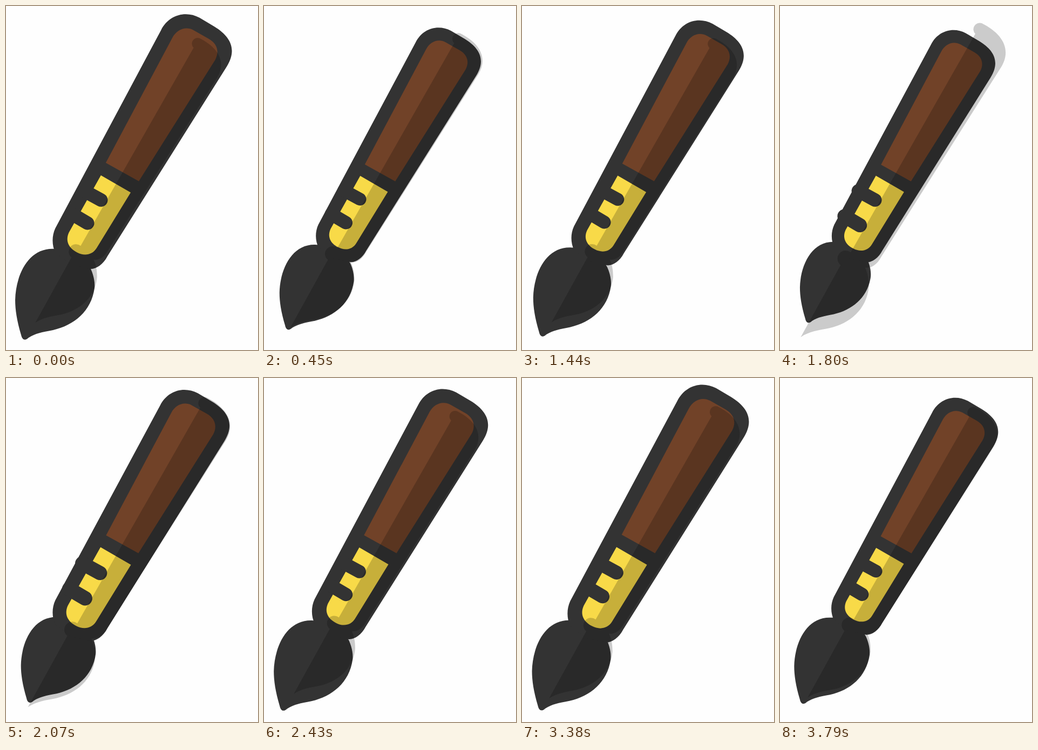
Recreate the animation shown at these times as an HTML page. Size 467x640 px, loop 3.9 s.

```html
<!DOCTYPE html>
<html lang="en">
<head>
<meta charset="utf-8">
<title>Paintbrush</title>
<style>
  html, body { margin: 0; width: 100%; height: 100%; overflow: hidden; background: #fefefe; }
  svg { display: block; width: 100vw; height: 100vh; }
</style>
</head>
<body>
<svg viewBox="0 0 467 640" fill="#333">
  <path id="bristles" d="M28 612C20 585 17 565 17 547C18 500 42 449 90 452L135 452L157 489C163 502 165 515 164 525C158 568 126 594 87 603C66 607 55 609 42 617C36 623 30 622 28 612Z"/>
  <path id="body"/>
  <path id="handle" fill="#714228" d="M185 292L308 60C316 45 332 38 347 46L375 62C391 71 395 86 387 101L246 326Z"/>
  <path id="ferrule" fill="#f8da48" d="M176 315L231 347L168 450C160 463 145 465 132 458C116 450 110 436 117 421Z"/>
  <g fill="none" stroke="#333" stroke-width="25" stroke-linecap="round">
    <path id="upperNotch" d="M145 344L176 361"/>
    <path id="lowerNotch" d="M124 388L151 404"/>
  </g>
  <path id="shade" fill="#000" fill-opacity=".2" d="M36 620L111 484A12 12 0 0 1 130 460L364 48A12 12 0 0 1 376 28C416 48 432 78 413 110L187 469C179 484 168 490 157 489C162 500 164 510 164 525C160 568 128 594 90 603C70 607 52 609 36 620Z"/>
</svg>
<script>
const CX = 209, CY = 329, LOOP = 3900, AMP = .054;

// Every part pulses alike; the lead (degrees) grows from part to part.
const parts = {
  bristles: { lead: 0, mean: .946, x: 202 },
  handle: { lead: 30, mean: .959 },
  ferrule: { lead: 60, mean: .98 },
  upperNotch: { lead: 90, mean: 1.004 },
  lowerNotch: { lead: 120, mean: 1.03 },
  shade: { lead: 150, mean: .943 }
};
const base = { lead: 45, mean: .97 };

const byId = id => document.getElementById(id);

// Held steps: 90 ms each at first, then 100 ms, with a longer last pair.
function stepAt(t) {
  if (t >= 3790) return 41;
  return t < 2880 ? Math.floor(t / 90) : Math.min(40, 32 + Math.floor((t - 2880) / 100));
}

// Starts slowly and settles into a steady beat.
const phaseAt = n => 4 + n * (28.6 - 15.5 * Math.exp(-n / 10));

const scaleOf = (part, phase) =>
  part.mean + AMP * Math.cos((phase + part.lead) * Math.PI / 180);

// The outline's upper end follows the handle, its lower end has its own pulse.
function bodyPath(top, bottom) {
  const at = s => (x, y) => `${CX + (x - CX) * s} ${CY + (y - CY) * s} `;
  const u = at(top), d = at(bottom);
  return "M" + d(92, 413) + "L" + u(287, 46) +
    "C" + u(301, 18) + u(332, 9) + u(358, 23) + "L" + u(385, 39) +
    "C" + u(416, 58) + u(428, 82) + u(408, 114) + "L" + d(188, 465) +
    "C" + d(180, 481) + d(165, 490) + d(155, 488) +
    "L" + d(120, 480) + "L" + d(92, 458) +
    "C" + d(86, 446) + d(85, 428) + d(92, 413) + "Z";
}

function draw(t) {
  const phase = phaseAt(stepAt(t));
  for (const [id, part] of Object.entries(parts)) {
    const x = part.x || CX;
    byId(id).setAttribute("transform",
      `translate(${x} ${CY}) scale(${scaleOf(part, phase)}) translate(${-x} ${-CY})`);
  }
  byId("body").setAttribute("d", bodyPath(scaleOf(parts.handle, phase), scaleOf(base, phase)));
}

const start = performance.now();
function tick() {
  draw((performance.now() - start) % LOOP);
  requestAnimationFrame(tick);
}
tick();
</script>
</body>
</html>
```
